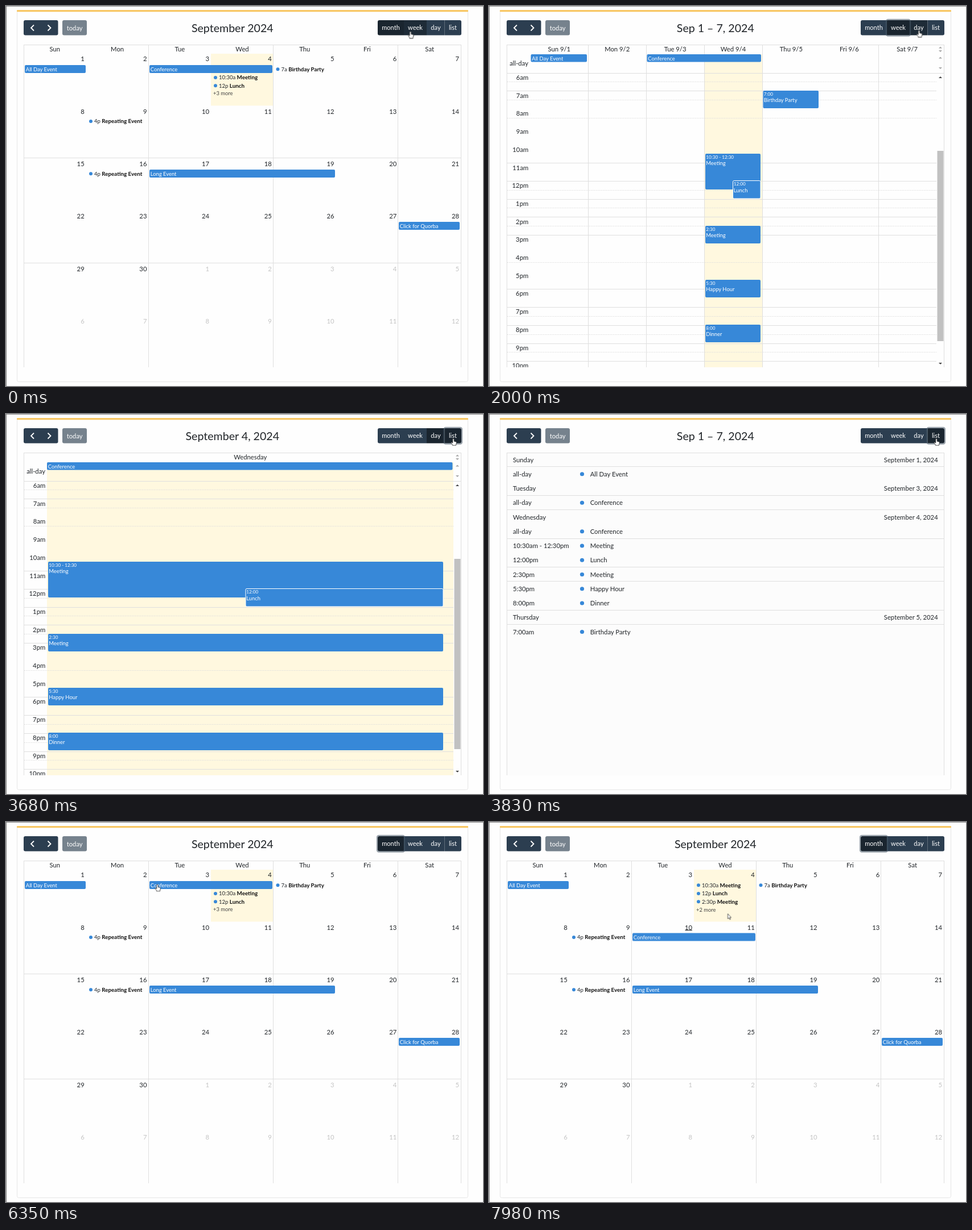
Animation, 838 px wide and 669 px high, one loop 8000 ms. Source, as an HTML page:

```html
<!DOCTYPE html>
<html lang="en">
<head>
<meta charset="utf-8">
<title>Calendar views</title>
<style>
html, body { margin: 0; width: 100%; height: 100%; overflow: hidden; background: #fefefe; }
svg { display: block; width: 838px; height: 669px; font-family: Lato, "Open Sans", sans-serif; }
text { white-space: pre; }
.anim { animation: 8s step-end infinite; }

#month { animation-name: month; }
#week { animation-name: week; }
#day { animation-name: day; }
#list { animation-name: list; }
@keyframes month { 0% { opacity: 1 } 16% { opacity: 0 } 67.625% { opacity: 1 } }
@keyframes week { 0% { opacity: 0 } 16% { opacity: 1 } 30.5% { opacity: 0 } }
@keyframes day { 0% { opacity: 0 } 30.5% { opacity: 1 } 47.875% { opacity: 0 } }
@keyframes list { 0% { opacity: 0 } 47.875% { opacity: 1 } 67.625% { opacity: 0 } }

/* Button fills: idle #2c3e50, hover #1e2b37, active #1a252f */
#month-btn { animation-name: month-btn; }
#week-btn { animation-name: week-btn; }
#day-btn { animation-name: day-btn; }
#list-btn { animation-name: list-btn; }
@keyframes month-btn {
  0% { fill: #1a252f } 16% { fill: #2c3e50 } 60.625% { fill: #1e2b37 } 65.75% { fill: #1a252f }
}
@keyframes week-btn {
  0% { fill: #1e2b37 } 10.625% { fill: #1a252f } 12.5% { fill: #1e2b37 } 16% { fill: #1a252f }
  30.5% { fill: #2c3e50 } 57% { fill: #1e2b37 } 60.625% { fill: #2c3e50 }
}
@keyframes day-btn {
  0% { fill: #2c3e50 } 19.625% { fill: #1e2b37 } 30.5% { fill: #1a252f } 47.875% { fill: #2c3e50 }
  53.375% { fill: #1e2b37 } 57% { fill: #2c3e50 }
}
@keyframes list-btn {
  0% { fill: #2c3e50 } 36% { fill: #1e2b37 } 46% { fill: #1a252f } 67.625% { fill: #2c3e50 }
}

#month-ring { animation-name: month-ring; }
#week-ring { animation-name: week-ring; }
#day-ring { animation-name: day-ring; }
#list-ring { animation-name: list-ring; }
@keyframes month-ring { 0% { opacity: 0 } 65.75% { opacity: 1 } }
@keyframes week-ring { 0% { opacity: 0 } 10.625% { opacity: 1 } 30.5% { opacity: 0 } }
@keyframes day-ring { 0% { opacity: 0 } 30.5% { opacity: 1 } 46% { opacity: 0 } }
@keyframes list-ring { 0% { opacity: 0 } 46% { opacity: 1 } 65.75% { opacity: 0 } }

/* Dragging the event one week down */
#dragged { animation-name: drag; }
#target { animation-name: target; }
#before { animation-name: before; }
#after { animation-name: after; }
#underline { animation-name: underline; }
@keyframes drag {
  0% { transform: none; opacity: 1 }
  84.375% { transform: translate(-1px, 8px); opacity: .78 }
  86.125% { transform: translate(-5px, 38px); opacity: .78 }
  87.75% { transform: translate(-9px, 70px); opacity: .78 }
  89.625% { transform: translate(-11px, 80px); opacity: .78 }
  91.125% { transform: translate(-11px, 85px); opacity: .78 }
  94.875% { transform: translate(0, 91.5px); opacity: 1 }
}
@keyframes target {
  0% { opacity: 0; transform: none } 84.375% { opacity: 1; transform: none }
  87.75% { opacity: 1; transform: translate(0, 92px) } 94.875% { opacity: 0 }
}
@keyframes before { 0% { opacity: 1 } 94.875% { opacity: 0 } }
@keyframes after { 0% { opacity: 0 } 94.875% { opacity: 1 } }
@keyframes underline { 0% { opacity: 0 } 98.125% { opacity: 1 } }

#cursor { animation-name: cursor; }
#hand { animation-name: hand; }
#arrow { animation-name: arrow; }
@keyframes cursor {
  0% { transform: translate(711.5px, 44.5px) }
  1.875% { transform: translate(716px, 43.5px) }
  12.5% { transform: translate(770px, 60px) }
  16% { transform: translate(770px, 58px) }
  17.75% { transform: translate(767px, 54px) }
  19.625% { transform: translate(763px, 49px) }
  21.375% { transform: translate(759px, 46px) }
  23.125% { transform: translate(757px, 44px) }
  25% { transform: translate(756.5px, 42.5px) }
  32.375% { transform: translate(758px, 42.5px) }
  34.125% { transform: translate(764px, 43px) }
  36% { transform: translate(773px, 43px) }
  37.75% { transform: translate(780px, 43px) }
  39.5% { transform: translate(785px, 43px) }
  41.25% { transform: translate(787px, 43px) }
  51.625% { transform: translate(783px, 42px) }
  53.375% { transform: translate(767px, 42px) }
  55.25% { transform: translate(748px, 41px) }
  57% { transform: translate(726px, 41px) }
  58.75% { transform: translate(706px, 41px) }
  60.625% { transform: translate(688px, 41px) }
  62.375% { transform: translate(679px, 41px) }
  64.25% { transform: translate(676px, 41px) }
  67.625% { transform: translate(599.5px, 53.5px) }
  69.5% { transform: translate(520px, 72px) }
  71.25% { transform: translate(430px, 93px) }
  72.875% { transform: translate(350px, 106px) }
  74.375% { transform: translate(302px, 109px) }
  75.875% { transform: translate(278px, 108px) }
  77.375% { transform: translate(266px, 106px) }
  79.375% { transform: translate(267px, 109.5px) }
  84.375% { transform: translate(264px, 127px) }
  86.125% { transform: translate(260px, 158px) }
  87.75% { transform: translate(256px, 189.5px) }
  89.625% { transform: translate(254px, 200px) }
  91.125% { transform: translate(254px, 205px) }
  96.625% { transform: translate(305px, 196px) }
  98.125% { transform: translate(354px, 184px) }
  99.75% { transform: translate(419.5px, 161.5px) }
}
@keyframes hand {
  0% { opacity: 1 } 12.5% { opacity: 0 } 19.625% { opacity: 1 } 67.625% { opacity: 0 }
  72.875% { opacity: 1 } 84.375% { opacity: 0 } 94.875% { opacity: 1 } 98.125% { opacity: 0 }
}
@keyframes arrow {
  0% { opacity: 0 } 12.5% { opacity: 1 } 19.625% { opacity: 0 } 67.625% { opacity: 1 }
  72.875% { opacity: 0 } 84.375% { opacity: 1 } 94.875% { opacity: 0 } 98.125% { opacity: 1 }
}
</style>
</head>
<body>
<svg id="stage" viewBox="0 0 838 669" xmlns="http://www.w3.org/2000/svg"></svg>
<script>
const BLUE = '#3788d8', NAVY = '#2c3e50', INK = '#212529', LINE = '#dfdfdf', TODAY = '#fff8df';
const DAYS = ['Sun', 'Mon', 'Tue', 'Wed', 'Thu', 'Fri', 'Sat'];

const box = (x, y, w, h, fill, more = '') =>
  `<rect x="${x}" y="${y}" width="${w}" height="${h}" fill="${fill}" ${more}/>`;
const text = (s, x, y, size = 11.3, fill = INK, anchor = 'start') =>
  `<text x="${x}" y="${y + size * .36}" font-size="${size}" fill="${fill}" text-anchor="${anchor}">${s}</text>`;
const center = (s, x, y, size, fill) => text(s, x, y, size, fill, 'middle');
const right = (s, x, y, fill) => text(s, x, y, 11.3, fill, 'end');
const group = (id, body) => `<g id="${id}" class="anim">${body}</g>`;
const each = (list, f) => list.map(f).join('');
const dot = (x, y, r) => `<circle cx="${x}" cy="${y}" r="${r}" fill="${BLUE}"/>`;
const bar = (s, x, y, w, h = 14) => box(x, y, w, h, BLUE, 'rx="2"') + text(s, x + 1.8, y + 7.2, 9.4, '#fff');
const dotted = (time, name, x, y) =>
  dot(x, y, 3) + text(`${time} <tspan font-weight="700" font-size="9.8" fill="#111">${name}</tspan>`, x + 6, y, 9.5);
const title = s => center(s, 397.8, 38.5, 19.6);
const frame = () => box(31, 68, 769, 1, LINE) + box(31, 68, 1, 568, LINE) + box(799, 68, 1, 568, LINE);

function toolbar() {
  const buttons = [['month', 653, 46, 676], ['week', 699, 40, 719], ['day', 739, 31.5, 755], ['list', 770.5, 29.5, 785]];
  const chevron = (x, d) =>
    `<path d="M${x + 2.5 * d} 33.5l${-5 * d} 5l${5 * d} 5" fill="none" stroke="#fff" stroke-width="1.8"/>`;
  return box(31, 25, 60.5, 26.5, NAVY, 'rx="3"') + chevron(46.5, 1) + chevron(76, -1) +
    box(99, 25, 43, 26.5, '#76828d', 'rx="3"') + center('today', 120.7, 38.5, 11.2, '#fff') +
    '<clipPath id="rounded"><rect x="653" y="25" width="147" height="26.5" rx="3"/></clipPath><g clip-path="url(#rounded)">' +
    each(buttons, ([n, x, w]) => box(x, 25, w, 27, NAVY, `id="${n}-btn" class="anim"`)) + '</g>' +
    each(buttons, ([n, x, w]) => box(x - 1, 24, w + 2, 28.5, 'none',
      `id="${n}-ring" class="anim" rx="3" stroke="#4c5b6a" stroke-opacity=".55" stroke-width="2.4"`)) +
    each(buttons, ([n, , , cx]) => center(n, cx, 38.5, 11.1, '#fff'));
}

function monthView() {
  const left = i => 31 + i * 109.72, rowY = 92.3;
  let out = title('September 2024') + box(360, 84, 109, 91.5, TODAY) +
    box(251, 84, 218, 91, '#bce8f1', 'id="target" class="anim" fill-opacity=".35"') + frame();
  out += each([250, 469, 688], x => box(x, 68, 1, 568, LINE)) + each([267, 452], y => box(31, y, 769, 1, LINE));
  out += each(DAYS, (d, i) => center(d, left(i + .5), 76));
  for (let i = 0; i < 42; i++) {
    const outside = i >= 30;
    out += right(outside ? i - 29 : i + 1, left(i % 7 + 1) - 3, 93.3 + rowY * Math.floor(i / 7), outside ? '#c4c4c4' : INK);
  }
  out += box(344.5, 190, 12.5, 1, INK, 'id="underline" class="anim"');
  out += bar('All Day Event', 33, 104, 107) + bar('Long Event', 252, 288, 326) + bar('Click for Quorba', 690, 380, 107);
  out += dotted('7a', 'Birthday Party', 477.5, 111.2);
  out += each([203, 295.3], y => dotted('4p', 'Repeating Event', 149, y));
  out += group('before', dotted('10:30a', 'Meeting', 368, 126) + dotted('12p', 'Lunch', 368, 140.3) +
    text('+3 more', 364, 154, 9.4, '#444'));
  out += group('after', dotted('10:30a', 'Meeting', 368, 111.3) + dotted('12p', 'Lunch', 368, 126) +
    dotted('2:30p', 'Meeting', 368, 140.3) + text('+2 more', 364, 154.3, 9.4, '#444'));
  return out + group('dragged', bar('Conference', 252, 104, 216));
}

const slotEvent = ([time, name, y, h], x, w, more = '') =>
  box(x, y, w, h, BLUE, `rx="2" ${more}`) + text(time, x + 1.3, y + 6, 8.1, '#fff') + text(name, x + 1.3, y + 17, 9.4, '#fff');

const scrollArrow = (y, d, fill) => `<path d="M790 ${y + 1.5 * d}h6l-3 ${-3 * d}z" fill="${fill}"/>`;

// Shared by week and day: today's column is shaded, its events start at x
function timeGrid(todayX, todayW, x, w) {
  const hour = 31.75, seven = 149;
  const hidden = [1, 2, 3, 9, 10], halves = [-1, 0, 1, 5, 6, 7, 9, 12, 13, 14];
  let out = box(todayX, 85, todayW, 551, TODAY);
  for (let i = 0; i < 16; i++)
    if (!hidden.includes(i)) out += box(32, Math.round(seven + i * hour), 754, 1, LINE);
  out += each(halves, i => {
    const y = Math.round(seven + (i + .5) * hour) + .5;
    return `<path d="M32 ${y}H786" stroke="#dcdcdc" stroke-dasharray="1.5 1.5"/>`;
  });
  out += box(31, 118, 769, 1, LINE) + frame();
  for (let h = 6; h <= 22; h++)
    out += right((h > 12 ? h - 12 : h) + (h < 12 ? 'am' : 'pm'), 69.3, 126 + (h - 6) * 31.7);
  out += right('all-day', 69, 100.5);
  out += box(787.5, 255, 11, 335, '#c1c1c1') + scrollArrow(125.5, 1, '#444') + scrollArrow(629.5, -1, '#444');
  out += each([[73, 1], [79.5, -1], [91, 1], [109.5, -1]], ([y, d]) => scrollArrow(y, d, '#a6a6a6'));
  out += each([['10:30 - 12:30', 'Meeting', 260, 63], ['2:30', 'Meeting', 387, 31],
    ['5:30', 'Happy Hour', 482, 31], ['8:00', 'Dinner', 561, 31]], e => slotEvent(e, x, w));
  return out + slotEvent(['12:00', 'Lunch', 307.5, 31.5], x + w / 2, w / 2, 'stroke="#fff"');
}

function weekView() {
  return title('Sep 1 – 7, 2024') + timeGrid(378.5, 101.5, 380, 97) +
    each([174, 276, 378, 480, 684], x => box(x, 68, 1, 568, LINE)) +
    each(DAYS, (d, i) => center(`${d} 9/${i + 1}`, 123.3 + i * 101.9, 76)) +
    bar('All Day Event', 73.5, 85, 98.5, 13.5) + bar('Conference', 277.5, 85, 200.5, 13.5) +
    slotEvent(['7:00', 'Birthday Party', 149, 31], 481.5, 97.5);
}

function dayView() {
  return title('September 4, 2024') + timeGrid(72, 714, 74, 694) +
    center('Wednesday', 429.3, 76) + bar('Conference', 72, 85, 712.5, 13.5);
}

function listView() {
  const rows = [['Sunday', 1], ['all-day', 'All Day Event'], ['Tuesday', 3], ['all-day', 'Conference'],
    ['Wednesday', 4], ['all-day', 'Conference'], ['10:30am - 12:30pm', 'Meeting'], ['12:00pm', 'Lunch'],
    ['2:30pm', 'Meeting'], ['5:30pm', 'Happy Hour'], ['8:00pm', 'Dinner'], ['Thursday', 5], ['7:00am', 'Birthday Party']];
  const pitch = 25.25;
  return title('Sep 1 – 7, 2024') + box(31, 68, 769, 568, '#fcfcfc') + frame() +
    each([1, 3, 4, 6, 8, 9, 11, 12], i => box(31, Math.floor(67.5 + i * pitch), 769, 1, LINE)) +
    each(rows, ([label, item], i) => {
      const y = 80.5 + i * pitch;
      return text(label, 42, y) + (typeof item === 'number'
        ? right(`September ${item}, 2024`, 788.7, y)
        : dot(163.5, y, 3.6) + text(item, 177.7, y));
    });
}

const card = box(19.5, 8.5, 792, 653, '#fefefe', 'rx="3" stroke="#e6e6e6"') + box(19, 7, 793, 3.3, '#f8c765', 'rx="1"') +
  box(0, 0, 838, 1, '#8c8c8c') + box(0, 0, 1, 669, '#808080');

const cursor = group('cursor', `<g fill="#fff" stroke="#2b2b2b" stroke-width=".8" stroke-linejoin="round">
  <path id="hand" class="anim" d="M-2.2 1.6Q-2 .5-1 .5T.2 1.6V5.1L3.6 6Q4.6 6.4 4.4 7.8L3.6 11V12.2H-2.6V11L-5 8Q-5.4 6.8-4.2 6.7L-2.2 8Z"/>
  <path id="arrow" class="anim" d="M0 0V9L2 7.2 3.5 10.2 4.9 9.6 3.4 6.7H6Z"/></g>`);

const clip = '<clipPath id="page"><rect width="838" height="636"/></clipPath>';
document.getElementById('stage').innerHTML = card + clip + '<g clip-path="url(#page)">' +
  group('month', monthView()) + group('week', weekView()) + group('day', dayView()) + group('list', listView()) +
  '</g>' + toolbar() + cursor;
</script>
</body>
</html>
```
